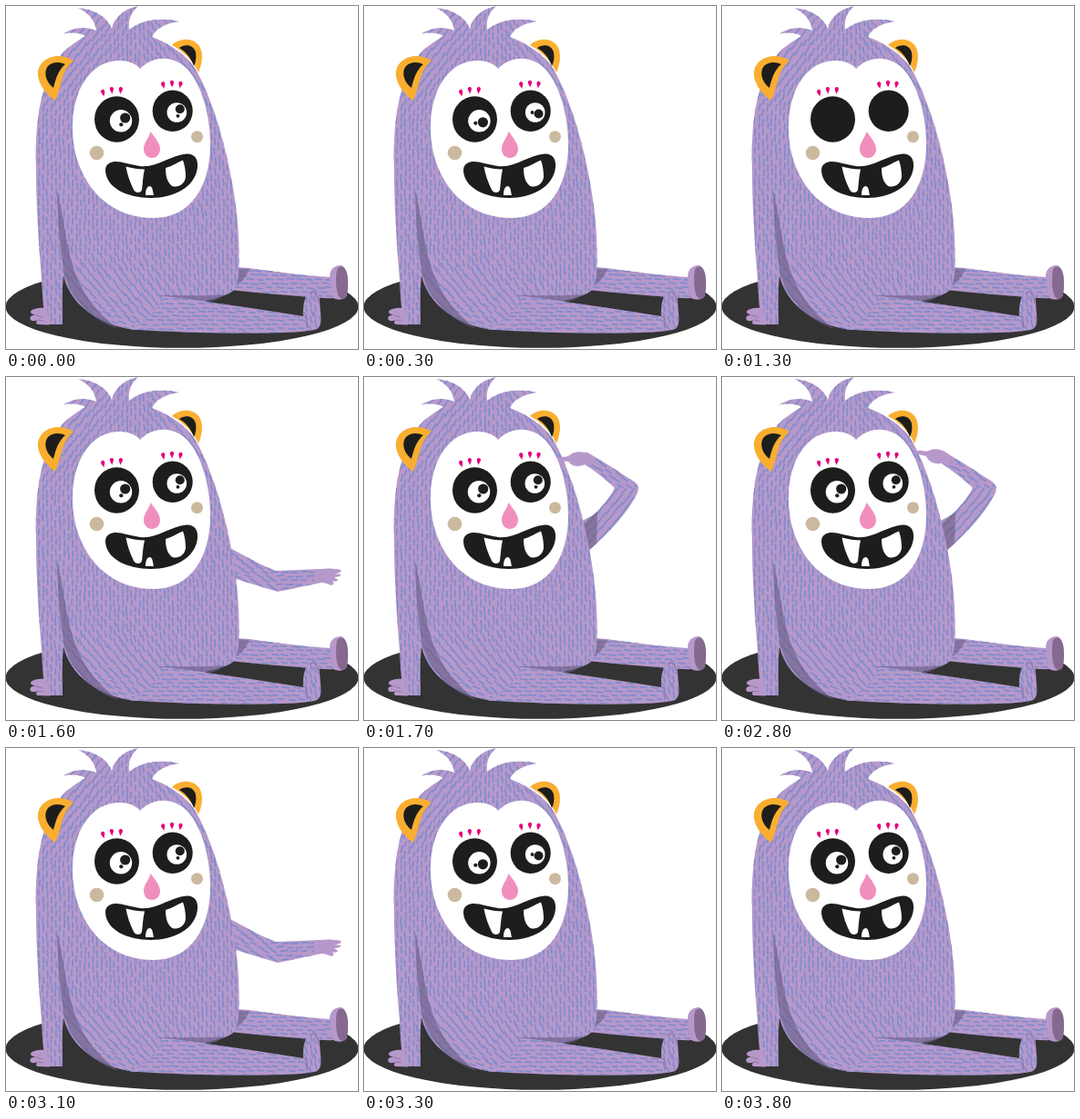
Animation, 386 px wide and 377 px high, one loop 5800 ms. Source, as an HTML page:

```html
<!DOCTYPE html>
<html lang="en">
<head>
<meta charset="utf-8">
<title>Furry monster</title>
<style>
html, body { margin: 0; width: 100%; height: 100%; overflow: hidden; background: #fff; }
svg { display: block; width: 386px; height: 377px; }
.skin { fill: #b798ca; }
.fur { fill: none; stroke: #7f8dcb; stroke-width: 1.8; stroke-linecap: round; }
.shade { fill: #6a5d85; fill-opacity: .62; }
.ink { fill: #1d1d1b; }
.ear { fill: #f9ae2f; }
.line { fill: none; stroke: #8f78ae; stroke-width: 1.2; }
</style>
</head>
<body>
<svg viewBox="0 0 386 377">
  <defs id="defs"></defs>
  <ellipse cx="193" cy="330.500" rx="193.500" ry="45.300" fill="#333"/>

  <g id="farLeg"></g>
  <path class="shade" d="M250 288L267 289C263 297 260 303 251 307Z"/>
  <path class="skin" d="M355 297C355 289 361 285 367 285C374 286 375 302 374 318C372 323 364 324 359 321C356 315 357 305 355 297Z"/>
  <path fill="#86698f" d="M364 288C371 283 375 292 375 303C375 312 375 321 370 322C364 323 362 312 362 303C362 297 362 291 364 288Z"/>

  <g id="lowArm"></g>
  <g id="pointArm">
    <path class="skin" d="M338 212C348 210 358 210 367 212C369 214 364 216 360 216L367 217C368 219 364 220 360 220L364 223C363 225 360 225 358 224C361 228 358 230 354 228C348 225 343 226 338 227Z"/>
  </g>
  <g id="scratchArm">
    <path class="shade" d="M256 149L255 183L246 191L236 160Z"/>
  </g>

  <path class="ear" d="M182 43C190 35 205 34 212 44C217 52 215 64 211 73C205 60 195 50 182 43Z"/>
  <path class="ink" d="M190 46C197 41 206 43 208 51C209 57 208 62 206 66C203 57 197 50 190 46Z"/>
  <g id="body"></g>
  <path class="shade" d="M56 203C57 250 61 276 64 296C74 325 95 346 124 355C97 336 81 312 73 285C66 262 62 225 56 203Z"/>
  <path class="shade" d="M165 318C195 318 220 319 240 317C235 321 230 324 222 325C204 323 185 320 165 318Z"/>
  <g id="nearLeg"></g>
  <path class="line" d="M326 341C331 341 330 348 331 354M333 316C337 311 342 316 343 327"/>
  <path class="skin" d="M45 332C36 331 28 333 27 336C27 339 31 339 34 340C28 339 25 342 27 345C29 347 33 346 36 345C32 346 32 350 36 350L48 350.500Z"/>
  <path class="line" d="M33 340L40 342M35 345L41 346"/>

  <path class="ear" d="M54 104C41 95 34 82 35 72C38 56 58 50 74 60C66 67 62 76 60 87Z"/>
  <path class="ink" d="M52 90C43 83 41 72 46 66C51 61 59 61 65 64C58 70 55 78 52 90Z"/>

  <path fill="#fff" d="M147 69C138 58 116 57 101 67C82 80 73 105 73 134C73 184 104 233 162 233C202 233 224 199 224 152C224 116 212 76 191 63C176 54 158 57 147 69Z"/>
  <g id="lashes" fill="#e5007e"></g>
  <circle cx="99.500" cy="161.500" r="7.800" fill="#cbb99f"/>
  <circle cx="209.500" cy="143.700" r="6.500" fill="#cbb99f"/>
  <path fill="#f08fbd" d="M158.500 138C163 144 169 151 169 157C169 163 165 167 160 167C155 167 151 163 151 157C151 150 157 145 158.500 138Z"/>
  <path class="ink" d="M113 173C121 168 132 174 147 176C166 178 180 164 198 162.500C207 162 211 169 210 177C208 199 184 211 159 211C133 211 110 200 109 181C109 177 110 175 113 173Z"/>
  <path fill="#fff" d="M131.500 176.500C139 178.500 145 179.500 152 179.500C150 187 150 195 149 202C148 206 142 206 140 202C136 194 133 185 131.500 176.500Z"/>
  <path fill="#fff" d="M175 178C182 176 188 172 194 169.500C196 175 197 181 197 188C196 197 186 201 181 197C176 192 175 185 175 178Z"/>
  <path fill="#fff" d="M153 208C153 201 155 198 158 198C161 199 161 204 162 208Z"/>

  <ellipse class="ink" cx="121.500" cy="124.500" rx="24.500" ry="25.200"/>
  <ellipse class="ink" cx="182.700" cy="115.300" rx="22" ry="22.800"/>
  <g id="eyes"></g>

  <g id="hand" class="skin">
    <path d="M250 86C243 80 233 77 227 81C223 83 216 79 214 82C213 85 219 86 224 87C226 93 233 96 240 95C244 94 248 96 252 98Z"/>
  </g>
</svg>
<script>
const $ = id => document.getElementById(id);

function add(parent, tag, attrs) {
  const el = document.createElementNS("http://www.w3.org/2000/svg", tag);
  for (const k in attrs) el.setAttribute(k, attrs[k]);
  parent.appendChild(el);
  return el;
}

let seed = 7;
function rand() {
  seed = (seed * 16807) % 2147483647;
  return seed / 2147483647;
}

// Staggered short strokes; angle 0 points straight down.
function strokes([x0, y0, x1, y1], angle, flat) {
  const across = flat ? y1 - y0 : x1 - x0;
  const along = flat ? x1 - x0 : y1 - y0;
  let d = "";
  for (let i = 0; i * 4.6 < across; i++) {
    for (let j = 0; j * 11 < along + 11; j++) {
      const u = i * 4.6 + rand() * 1.6;
      const v = j * 11 + (i % 2) * 5.5 + rand() * 3 - 6;
      const x = x0 + (flat ? v : u), y = y0 + (flat ? u : v);
      const a = angle(x, y), r = 2.8 + rand() * 1.2;
      const dx = Math.sin(a) * r, dy = Math.cos(a) * r;
      d += `M${(x - dx).toFixed(1)} ${(y - dy).toFixed(1)}L${(x + dx).toFixed(1)} ${(y + dy).toFixed(1)}`;
    }
  }
  return d;
}

function furry(id, shape, box, angle, flat) {
  const clip = add($("defs"), "clipPath", { id: id + "Clip" });
  add(clip, "path", { d: shape });
  const g = add($(id), "g", {});
  add(g, "path", { d: shape, class: "skin" });
  add(g, "path", { d: strokes(box, angle, flat), class: "fur", "clip-path": `url(#${id}Clip)` });
  $(id).prepend(g);
}

function bodyAngle(x, y) {
  const head = (x - 140) / 100 * Math.max(0, (130 - y) / 90);
  if (x < 62 && y > 190) return 0.06;
  const bend = Math.pow(Math.max(0, (y - 245) / 105), 1.5) * 1.4;
  const near = Math.min(1, Math.max(0, (220 - x) / 110));
  return head + 0.1 * (x - 100) / 150 + bend * near;
}

furry("body",
  "M40 98C46 74 56 54 72 43C77 39 82 36 87 33C80 29 72 29 63 30.500C74 23 86 22 99 27C98 16 90 7 79 2C98 4 111 12 116 25C119 12 130 3 145 0C136 8 134 16 135 26C148 15 169 12 190 17C174 19 164 25 160 34C178 41 196 52 207 68C223 95 239 144 247 189C254 225 257 262 255 296C254 303 252 309 249 313C243 318 234 320 222 323L150 356C116 356 72 336 63 296C61 315 62 334 62 350L44 350C41 335 40 320 39 300C36 262 33 220 33 180C32 148 34 120 40 98Z",
  [26, 0, 262, 358], bodyAngle, false);

furry("nearLeg",
  "M175 319C222 325 276 333 326 341C325 325 330 312 338 311C344 312 344 324 345 338C346 348 345 355 338 356C331 357 325 358 316 358.500C262 361 190 359 136 355.500C154 346 167 332 175 319Z",
  [130, 308, 350, 362], x => x > 326 ? 0.25 : 1.47, true);

furry("farLeg",
  "M245 287L266 288C296 292 324 296 356 298L359 321C350 322 342 320 335 320C306 318 276 315 245 312Z",
  [244, 286, 360, 322], () => 1.47, true);

furry("pointArm",
  "M244 187C263 197 279 207 296 213L345 211L345 226C330 229 315 233 298 236C280 231 263 225 246 220Z",
  [244, 186, 340, 238], x => x < 294 ? 1.1 : 1.65, true);

furry("lowArm",
  "M244 187C262 199 275 214 284 228L309 260C316 268 321 279 317 285C312 288 303 282 298 274C285 263 268 250 248 234Z",
  [244, 186, 320, 278], () => 0.75, true);

furry("scratchArm",
  "M244 193L234 167C253 152 268 136 275 122C266 113 254 104 241 95L243 82C260 91 279 104 296 115C301 118 302 123 299 129C289 149 270 170 244 193Z",
  [234, 80, 303, 192], (x, y) => y > 121 ? -0.68 : 1.02, false);

for (const [x, y, a] of [[106.5, 95.5, -14], [116, 92.7, -5], [125.7, 92.7, 6],
                        [172.5, 87, -12], [182, 85.6, -2], [191.3, 86.5, 8]]) {
  add($("lashes"), "path", {
    d: "M0 4C1 1 2.2 0 2.1 -1.8C1.9 -4.4 -1.9 -4.4 -2.1 -1.8C-2.2 0 -1 1 0 4Z",
    transform: `translate(${x} ${y}) rotate(${a})`
  });
}

const dot = (parent, x, y, r, fill) => add(parent, "circle", { cx: x, cy: y, r, fill });

function look(dots, shift) {
  const g = add($("eyes"), "g", {});
  dot(g, 126 + shift, 126.3, 12.2, "#fff");
  dot(g, 187.3 + shift, 117, 10.8, "#fff");
  for (const [x, y, r] of dots) dot(g, x, y, r, "#1d1d1b");
  return g;
}

const eyes = {
  up: look([[130.7, 123, 5.6], [126.3, 130.3, 2.1], [190.8, 113.2, 5], [188.5, 120.8, 1.9]], 0),
  side: look([[130.4, 127.8, 5.6], [122.3, 128.8, 2.1], [191.5, 118.5, 5], [184.5, 117, 1.9]], 0.4)
};
const arms = { low: $("lowArm"), point: $("pointArm"), scratch: $("scratchArm") };

// start time, eyes, arm
const steps = [
  [0, "up", ""], [100, "shut", ""], [300, "side", ""], [1300, "shut", ""],
  [1500, "up", "low"], [1600, "up", "point"], [1700, "up", "scratch"],
  [3100, "up", "point"], [3200, "up", "low"], [3300, "side", ""], [3800, "up", ""]
];
const LOOP = 5800;

const show = (el, on) => { el.style.display = on ? "" : "none"; };

function draw(t) {
  const [, eye, arm] = steps.findLast(s => s[0] <= t);
  for (const k in eyes) show(eyes[k], k === eye);
  for (const k in arms) show(arms[k], k === arm);
  show($("hand"), arm === "scratch");
  const scratching = t >= 2200 && t < 3000;
  const raised = scratching && Math.floor((t - 2200) / 100) % 2 === 0;
  $("hand").setAttribute("transform", raised ? "" : "rotate(-14 247 90)");
}

const start = performance.now();
function tick() {
  draw((performance.now() - start) % LOOP);
  requestAnimationFrame(tick);
}
tick();
</script>
</body>
</html>
```
